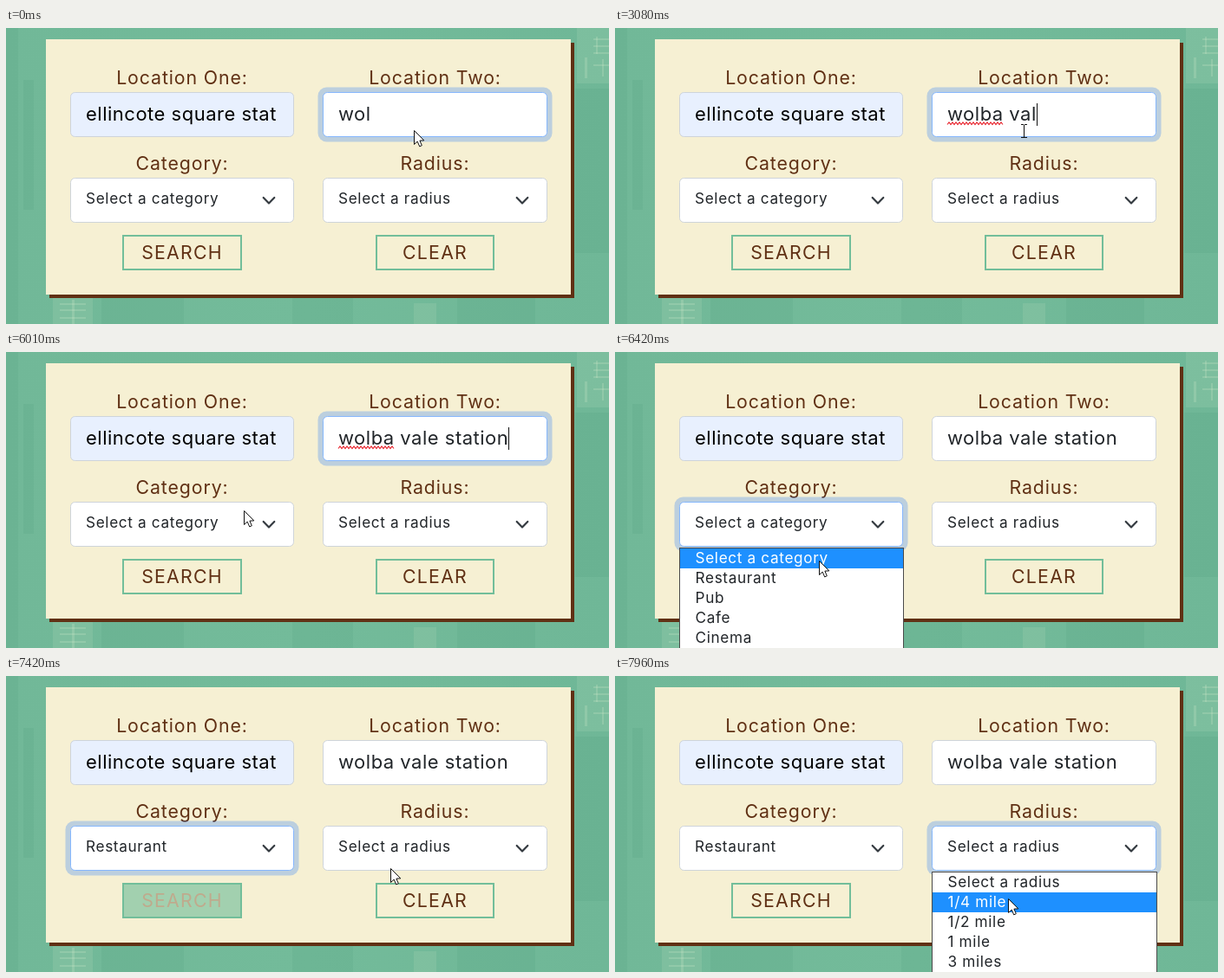
An HTML page with a canvas that plays this animation: 695x342 px, repeating every 8 s.

```html
<!DOCTYPE html>
<html lang="en">
<head>
<meta charset="utf-8">
<title>Halfway search form</title>
<style>
html, body { margin: 0; width: 100%; height: 100%; overflow: hidden; background: #71b998; }
canvas { display: block; }
</style>
</head>
<body>
<canvas id="stage" width="695" height="342"></canvas>
<script>
const ctx = document.getElementById('stage').getContext('2d');
const LOOP = 8000, FRAME = 1000 / 15;

const CREAM = [246, 240, 211], BROWN = [96, 48, 20], GREEN = [114, 190, 154];
const INK = '#212529', BORDER = [206, 212, 218], FOCUS = [134, 183, 254];

const STYLES = {
  label:  { font: '21.3px Inter, sans-serif', gap: '0.9px' },
  button: { font: '21.3px Inter, sans-serif', gap: '1.25px' },
  field:  { font: '22px Inter, sans-serif', gap: '0.5px' },
  option: { font: '17.2px Inter, sans-serif', gap: '0.65px' }
};

const FIELDS = {
  one:      { x: 74,  y: 74,  w: 258, h: 52 },
  two:      { x: 365, y: 74,  w: 259, h: 52 },
  category: { x: 74,  y: 173, w: 258, h: 52 },
  radius:   { x: 365, y: 173, w: 259, h: 52 }
};

const CATEGORIES = ['Select a category', 'Restaurant', 'Pub', 'Cafe', 'Cinema'];
const RADII = ['Select a radius', '1/4 mile', '1/2 mile', '1 mile', '3 miles'];

const PLACE = 'wolba vale station', MISSPELT = 'wolba';
const KEYS = [1870, 2070, 2540, 2740, 2940, 3080, 3350, 3540, 3740,
              4000, 4260, 4390, 4590, 4790, 4940];

// time, x, y of the pointer tip
const PATH = [
  [0, 470, 118], [1250, 470, 118], [1267, 471, 119], [5600, 471, 119],
  [5733, 440, 124], [5867, 338, 150], [6000, 274, 183], [6070, 274, 183],
  [6200, 252, 198], [6333, 237, 222], [6400, 235, 241], [6467, 235, 250],
  [6600, 238, 276], [6667, 240, 268], [7067, 241, 268], [7200, 258, 263],
  [7333, 350, 242], [7400, 443, 222], [7533, 472, 213], [7600, 474, 212],
  [7733, 474, 212], [7867, 468, 224], [7933, 453, 257], [8000, 453, 257]
];

const ramp = (t, a, b) => Math.min(1, Math.max(0, (t - a) / (b - a)));
const mix = (a, b, k) => a.map((v, i) => Math.round(v + (b[i] - v) * k));
const rgb = c => `rgb(${c.join()})`;

function pointerAt(t) {
  const i = Math.max(1, PATH.findIndex(p => p[0] >= t));
  const [t0, x0, y0] = PATH[i - 1], [t1, x1, y1] = PATH[i];
  const k = ramp(t, t0, t1);
  return { x: Math.round(x0 + (x1 - x0) * k), y: Math.round(y0 + (y1 - y0) * k) };
}

function setStyle(name) {
  ctx.font = STYLES[name].font;
  ctx.letterSpacing = STYLES[name].gap;
}

function text(str, x, y, style, color, align = 'left') {
  setStyle(style);
  ctx.textAlign = align;
  ctx.fillStyle = color;
  ctx.fillText(str, x, y);
}

function widthOf(str) {
  setStyle('field');
  return ctx.measureText(str).width;
}

function rect(x, y, w, h, color) {
  ctx.fillStyle = color;
  ctx.fillRect(x, y, w, h);
}

function line(points, color, width) {
  ctx.beginPath();
  points.forEach(([x, y]) => ctx.lineTo(x, y));
  ctx.strokeStyle = color;
  ctx.lineWidth = width;
  ctx.stroke();
}

function backdrop() {
  const g = ctx.createLinearGradient(0, 0, 695, 0);
  g.addColorStop(0, '#71b898');
  g.addColorStop(0.5, '#73bb9a');
  g.addColorStop(1, '#6fb797');
  rect(0, 0, 695, 342, g);
  const light = 'rgba(190,225,190,0.16)', dark = 'rgba(40,120,90,0.07)';
  rect(0, 0, 14, 342, dark);
  rect(20, 60, 12, 150, dark);
  rect(110, 312, 95, 30, dark);
  rect(330, 312, 70, 30, dark);
  rect(520, 312, 90, 30, dark);
  rect(656, 70, 39, 190, dark);
  rect(54, 312, 46, 30, light);
  rect(470, 318, 26, 24, light);
  rect(658, 0, 37, 64, light);
  // faint sign strokes
  const sign = 'rgba(215,238,205,0.22)';
  for (const y of [318, 325, 334]) rect(62, y, 30, 2, sign);
  rect(76, 314, 3, 28, sign);
  for (const y of [12, 20, 28, 42]) rect(677, y, 18, 2, sign);
  rect(680, 10, 2, 20, sign);
  rect(687, 36, 2, 20, sign);
  rect(667, 34, 3, 24, sign);
}

function box(f, fill, focus) {
  if (focus > 0) {
    ctx.beginPath();
    ctx.roundRect(f.x - 5.5, f.y - 5.5, f.w + 11, f.h + 11, 10);
    ctx.fillStyle = `rgba(13,110,253,${0.25 * focus})`;
    ctx.fill();
  }
  ctx.beginPath();
  ctx.roundRect(f.x + 0.5, f.y + 0.5, f.w - 1, f.h - 1, 5);
  ctx.fillStyle = fill;
  ctx.fill();
  ctx.strokeStyle = rgb(mix(BORDER, FOCUS, focus));
  ctx.lineWidth = 1;
  ctx.stroke();
}

function select(f, value, focus) {
  box(f, '#fff', focus);
  text(value, f.x + 18, 203, 'option', INK);
  const cx = f.x + f.w - 29;
  ctx.lineCap = ctx.lineJoin = 'round';
  line([[cx - 6.3, 196], [cx, 202.5], [cx + 6.3, 196]], '#343a40', 2.2);
  ctx.lineCap = 'butt';
  ctx.lineJoin = 'miter';
}

function button(x, w, label, hover) {
  rect(x, 239, w, 41, rgb(GREEN));
  rect(x + 2, 241, w - 4, 37, rgb(mix(CREAM, GREEN, hover)));
  text(label, x + w / 2, 267, 'button', rgb(mix(BROWN, CREAM, hover)), 'center');
}

function menu(f, items, tipY) {
  rect(f.x, 226, f.w + 1, 130, '#4a4a4a');
  rect(f.x + 1, 227, f.w - 1, 130, '#fff');
  const active = Math.max(0, Math.floor((tipY - 227) / 23));
  items.forEach((item, i) => {
    if (i === active) rect(f.x + 1, 227 + i * 23, f.w - 1, 23, '#1e90ff');
    text(item, f.x + 18.5, 244 + i * 23, 'option', i === active ? '#fff' : INK);
  });
}

function typing(t, focused) {
  const typed = PLACE.slice(0, 3 + KEYS.filter(k => k <= t).length);
  const x = FIELDS.two.x + 18;
  text(typed, x, 107, 'field', INK);
  if (focused && t >= 2540) {
    const end = x + widthOf(MISSPELT), wave = [];
    for (let px = x, i = 0; px <= end; px += 2, i++) wave.push([px, i % 2 ? 109 : 111.5]);
    line(wave, '#e8202a', 1.1);
  }
  const caret = focused && t > 1300 && !(t >= 1800 && t < 1870) && !(t >= 5470 && t < 5980);
  if (caret) rect(Math.round(x + widthOf(typed)), 87, 1, 26, '#111');
}

function arrow({ x, y }) {
  ctx.beginPath();
  [[0, 0], [0, 16], [3.7, 12.6], [6.2, 18.4], [8.8, 17.2], [6.4, 11.6], [11.3, 11.4]]
    .forEach(([dx, dy]) => ctx.lineTo(x + dx + 0.5, y + dy + 0.5));
  ctx.closePath();
  ctx.fillStyle = '#fff';
  ctx.fill();
  ctx.strokeStyle = '#111';
  ctx.lineWidth = 1;
  ctx.stroke();
}

function beam({ x, y }) {
  rect(x, y - 7, 1, 15, '#111');
  for (const dy of [-8, 7]) {
    rect(x - 3, y + dy, 3, 1, '#111');
    rect(x + 1, y + dy, 3, 1, '#111');
  }
}

const inside = (p, f) => p.x >= f.x && p.x < f.x + f.w && p.y >= f.y && p.y < f.y + f.h;

function draw(t) {
  const ft = Math.floor((t + 10) / FRAME) * FRAME;
  const p = pointerAt(ft);
  const catFocus = ramp(ft, 6200, 6380) - ramp(ft, 7740, 7920);
  const radFocus = ramp(ft, 7740, 7920);
  const twoFocus = 1 - ramp(ft, 0, 133) + ramp(ft, 1267, 1460) - ramp(ft, 6200, 6380);
  const hover = ramp(ft, 6860, 7160) - ramp(ft, 7290, 7590);

  backdrop();
  rect(50, 17, 605, 295, rgb(BROWN));
  rect(46, 13, 605, 295, rgb(CREAM));

  const brown = rgb(BROWN);
  text('Location One:', 203, 65, 'label', brown, 'center');
  text('Location Two:', 494.5, 65, 'label', brown, 'center');
  text('Category:', 203, 164, 'label', brown, 'center');
  text('Radius:', 494.5, 164, 'label', brown, 'center');

  box(FIELDS.one, '#e8f0fe', 0);
  text('ellincote square stat', 92, 107, 'field', '#000');
  box(FIELDS.two, '#fff', twoFocus);
  typing(t, t > 1300 && t < 6200);

  select(FIELDS.category, CATEGORIES[t < 6900 ? 0 : 1], catFocus);
  select(FIELDS.radius, RADII[0], radFocus);
  button(134, 138, 'SEARCH', hover);
  button(426, 137, 'CLEAR', 0);

  if (t >= 6330 && t < 6900) menu(FIELDS.category, CATEGORIES, p.y);
  if (t >= 7830) menu(FIELDS.radius, RADII, p.y);

  if (t >= 1260 && inside(p, FIELDS.two)) beam(p);
  else arrow(p);
}

const start = performance.now();
function tick() {
  draw((performance.now() - start) % LOOP);
  requestAnimationFrame(tick);
}
tick();
</script>
</body>
</html>
```
